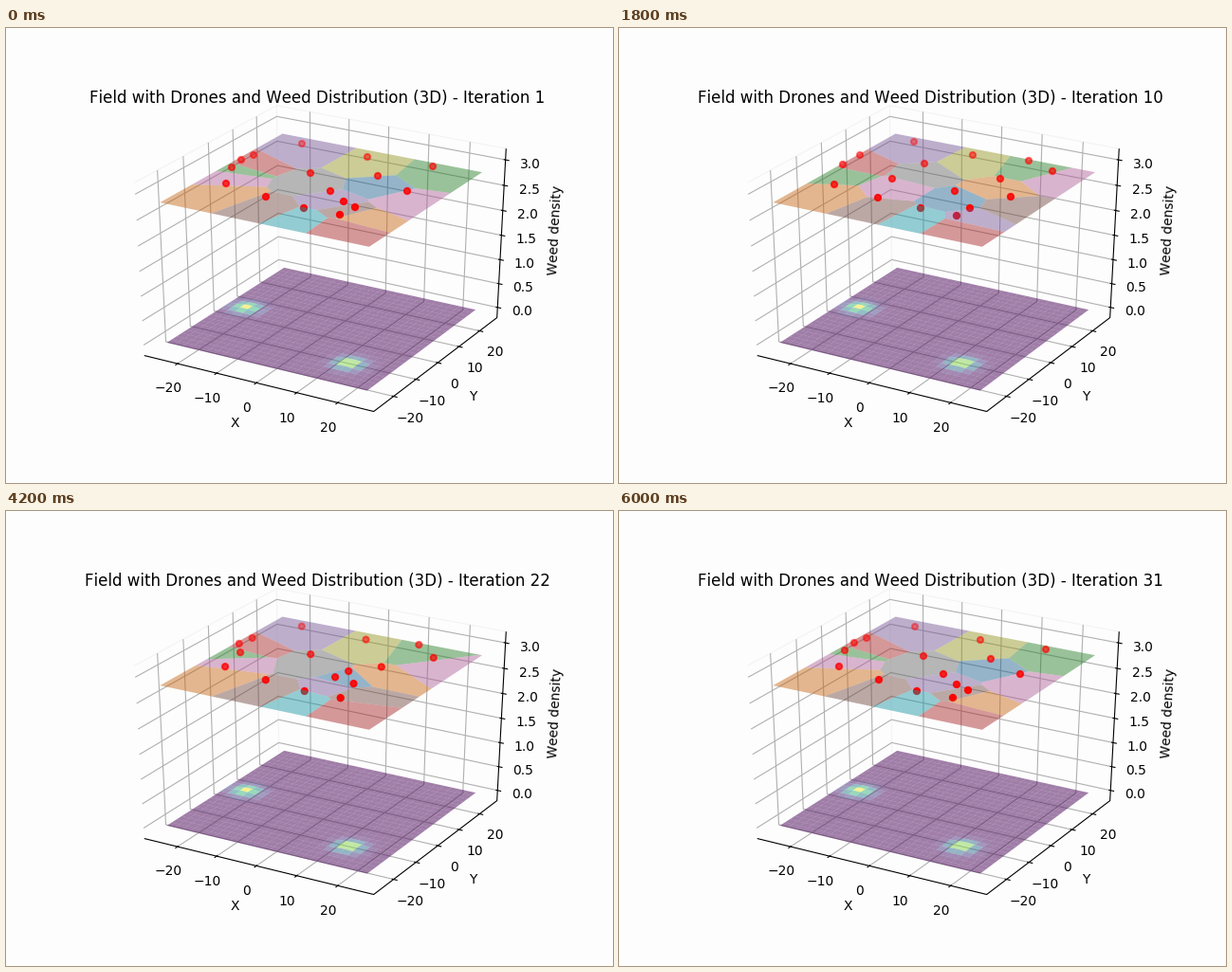
Recreate the animation shown at these times as a matplotlib script. Size 640 by 480 pixels, loop 6.2 s.

```python
import numpy as np
import matplotlib.pyplot as plt
from matplotlib.animation import FuncAnimation
from matplotlib.collections import LineCollection, PolyCollection
from matplotlib.colors import to_rgb

W, H, DPI = 640, 480, 100
HALF = 25               # field half width
CELL_Z, DRONE_Z = 2.8, 3.0
FRAMES, STEP = 31, 200
START, SETTLED, HOLD, END = 2, 7, 10, 31    # iterations
BACK = "#fdfdfd"
S3 = np.sqrt(3) / 2

plt.rcParams["font.family"] = "DejaVu Sans"
plt.rcParams["text.kerning_factor"] = 6
fig = plt.figure(figsize=(W / DPI, H / DPI), dpi=DPI, facecolor=BACK)
ax = fig.add_axes([0, 0, 1, 1])
ax.set_xlim(0, W)
ax.set_ylim(H, 0)
ax.axis("off")


# ---- camera: elevation 30, azimuth -60, perspective distance 10 ----
def unit(x, y, z):
    """World values to the centred unit cube."""
    return x / (2.2 * HALF), y / (2.2 * HALF), (z - 1.5) / 3.3


def depth(a, b, c):
    return 10 - 0.5 * S3 * a + 0.75 * b - 0.5 * c


def project(a, b, c):
    d = depth(a, b, c)
    px = 334.7 + 2681.1 * (S3 * a + 0.5 * b) / d
    py = 237.4 - 1997.8 * (-0.25 * a + 0.5 * S3 * b + S3 * c) / d
    return px, py


def unproject(px, py, z):
    """Stage position back to world x, y on the plane z."""
    c = (z - 1.5) / 3.3
    sx, sy = (px - 334.7) / 2681.1, (237.4 - py) / 1997.8
    q = (sy * (10 - 0.5 * c) - S3 * c) / (0.5 - S3 * sy)
    p = sx * (10 + S3 * q - 0.5 * c)
    return 2.2 * HALF * np.array([S3 * p - 0.5 * q, 0.5 * p + S3 * q])


def line(*pts):
    return [project(*p) for p in pts]


# ---- box, grid, ticks and labels ----
B = 25 / 48
TICK_IN, TICK_OUT = B - 1 / 120, B + 1 / 60
TICK_PAD, NAME_PAD = B + 0.0738, B + 0.1604
grid, ticks = [], []


def label(text, pos, **kw):
    px, py = project(*pos)
    ax.text(px, py, text, fontsize=10, ha="center", **kw)


for v in range(-20, 21, 10):
    u = v / (2.2 * HALF)
    name = str(v).replace("-", "\u2212")
    grid.append(line((u, -B, -B), (u, B, -B), (u, B, B)))
    grid.append(line((B, u, -B), (-B, u, -B), (-B, u, B)))
    ticks.append(line((u, -TICK_OUT, -B), (u, -TICK_IN, -B)))
    ticks.append(line((TICK_OUT, u, -B), (TICK_IN, u, -B)))
    label(name, (u, -TICK_PAD, -TICK_PAD), va="top")
    label(name, (TICK_PAD, u, -TICK_PAD), va="top")

for v in np.arange(0, 3.1, 0.5):
    u = (v - 1.5) / 3.3
    grid.append(line((-B, -B, u), (-B, B, u), (B, B, u)))
    ticks.append(line((TICK_OUT, B, u), (TICK_IN, B, u)))
    label(f"{v:.1f}", (TICK_PAD, TICK_PAD, u), va="top")

label("X", (0, -NAME_PAD, -NAME_PAD), va="center")
label("Y", (NAME_PAD, 0, -NAME_PAD), va="center")
label("Weed density", (NAME_PAD, NAME_PAD, 0), va="center", rotation=87.1,
      rotation_mode="anchor")

panes = [line((-B, -B, B), (-B, B, B), (B, B, B)),
         line((-B, B, -B), (-B, B, B))]
edges = [line((-B, -B, -B), (B, -B, -B), (B, B, -B), (B, B, B))]
for segs, color, z in ((panes, "#f3f3f3", 1), (grid, "#b0b0b0", 2),
                       (edges + ticks, "black", 3)):
    ax.add_collection(LineCollection(segs, colors=color, linewidths=0.8,
                                     zorder=z))


# ---- weed density on the floor: two normal distributions ----
def weeds(x, y, var=4):
    return sum(np.exp(-((x - cx) ** 2 + (y - cy) ** 2) / (2 * var))
               for cx, cy in ((-20, 0), (15, -15))) / (2 * np.pi * var)


side = np.array([0, 1, 2, 2, 2, 1, 0, 0])   # outline of one floor tile
quads, heat = [], []
for y in range(HALF - 2, -HALF - 1, -2):
    for x in range(-HALF, HALF, 2):
        rx, ry = x + side, y + np.roll(side, 2)
        h = weeds(rx, ry)
        heat.append(h.mean())
        quads.append(np.column_stack(project(*unit(rx, ry, h))))
heat = np.array(heat) / max(heat)
ax.add_collection(PolyCollection(quads, facecolors=plt.cm.viridis(heat),
                                 alpha=0.5, linewidths=0, zorder=4))


# ---- drones: an even 4 x 4 grid that settles, then drifts to the weeds ----
def ease_out(t):
    return 1 - (1 - t) ** 2


def ease_in(t):
    return t ** 3


fleet = []


def drone(settled, end, ease=ease_out):
    cell_xy = np.array(divmod(len(fleet), 4))
    fleet.append(((cell_xy - 1.5) * HALF / 2, unproject(*settled, DRONE_Z),
                  unproject(*end, DRONE_Z), ease))


drone((227, 165), (232, 164))
drone((236, 144), (248, 139))
drone((254, 134), (261, 134))
drone((311, 120), (312, 122))
drone((273, 179), (274, 178))
drone((288, 159), (238, 147))
drone((322, 143), (321, 153))
drone((373, 134), (381, 136))
drone((318, 190), (314, 190))
drone((354, 172), (392, 156), ease_in)
drone((402, 159), (368, 189), ease_in)
drone((432, 140), (450, 146), ease_in)
drone((356, 198), (352, 197))
drone((370, 190), (342, 172))
drone((413, 178), (356, 183))
drone((457, 151), (423, 172), ease_in)

SHADE = 0.7667          # light falling on a level surface
tints = [tuple(SHADE * np.array(to_rgb(f"C{i % 10}"))) + (0.45,)
         for i in range(1, len(fleet) + 1)]


def positions(it):
    s = ease_out(np.clip((it - START) / (SETTLED - START), 0, 1))
    t = np.clip((it - HOLD) / (END - HOLD), 0, 1)
    return np.array([start + (mid - start) * s + (end - mid) * ease(t)
                     for start, mid, end, ease in fleet])


def cell(i, pts):
    """Voronoi cell of point i, cut out of the square field."""
    poly = [np.array(p, float) for p in
            ((-HALF, -HALF), (HALF, -HALF), (HALF, HALF), (-HALF, HALF))]
    for j, other in enumerate(pts):
        if j == i:
            continue
        n, mid = other - pts[i], (other + pts[i]) / 2
        out = []
        for p, q in zip(poly, poly[1:] + poly[:1]):
            sp, sq = n @ (p - mid), n @ (q - mid)
            if sp <= 0:
                out.append(p)
            if sp * sq < 0:
                out.append(p + (q - p) * sp / (sp - sq))
        poly = out
    return np.array(poly)


far_cells = PolyCollection([], linewidths=0, zorder=5)
near_cells = PolyCollection([], linewidths=0, zorder=7)
ax.add_collection(far_cells)
ax.add_collection(near_cells)
dots = ax.scatter(np.zeros(len(fleet)), np.zeros(len(fleet)), s=20,
                  linewidths=1.5, zorder=6)
title = ax.text(328, 78.8, "", fontsize=12, ha="center", va="baseline",
                zorder=8)


def update(n):
    it = n + 1
    # the first view already shows the final layout
    pts = positions(it if n else END)
    at = unit(pts[:, 0], pts[:, 1], DRONE_Z)
    d = depth(*at)

    # cells reaching closer than every drone cover the drones
    layers = {False: ([], []), True: ([], [])}
    for i, tint in enumerate(tints):
        poly = cell(i, pts)
        corners = unit(poly[:, 0], poly[:, 1], CELL_Z)
        verts, colors = layers[bool(depth(*corners).min() < d.min())]
        verts.append(np.column_stack(project(*corners)))
        colors.append(tint)
    for coll, near in ((far_cells, False), (near_cells, True)):
        verts, colors = layers[near]
        coll.set_verts(verts)
        coll.set_facecolor(colors if colors else "none")

    # distant drones fade
    rgba = np.zeros((len(pts), 4))
    rgba[:, 0] = 1
    rgba[:, 3] = 1 - 0.6 * (d - d.min()) / (d.max() - d.min())
    order = np.argsort(-d)
    dots.set_offsets(np.column_stack(project(*at))[order])
    dots.set_facecolor(rgba[order])
    dots.set_edgecolor(rgba[order])

    title.set_text("Field with Drones and Weed Distribution (3D) - "
                   f"Iteration {it}")
    return far_cells, near_cells, dots, title


anim = FuncAnimation(fig, update, frames=FRAMES, interval=STEP,
                     init_func=lambda: [], repeat=True, repeat_delay=0,
                     blit=False)
plt.show()
```
